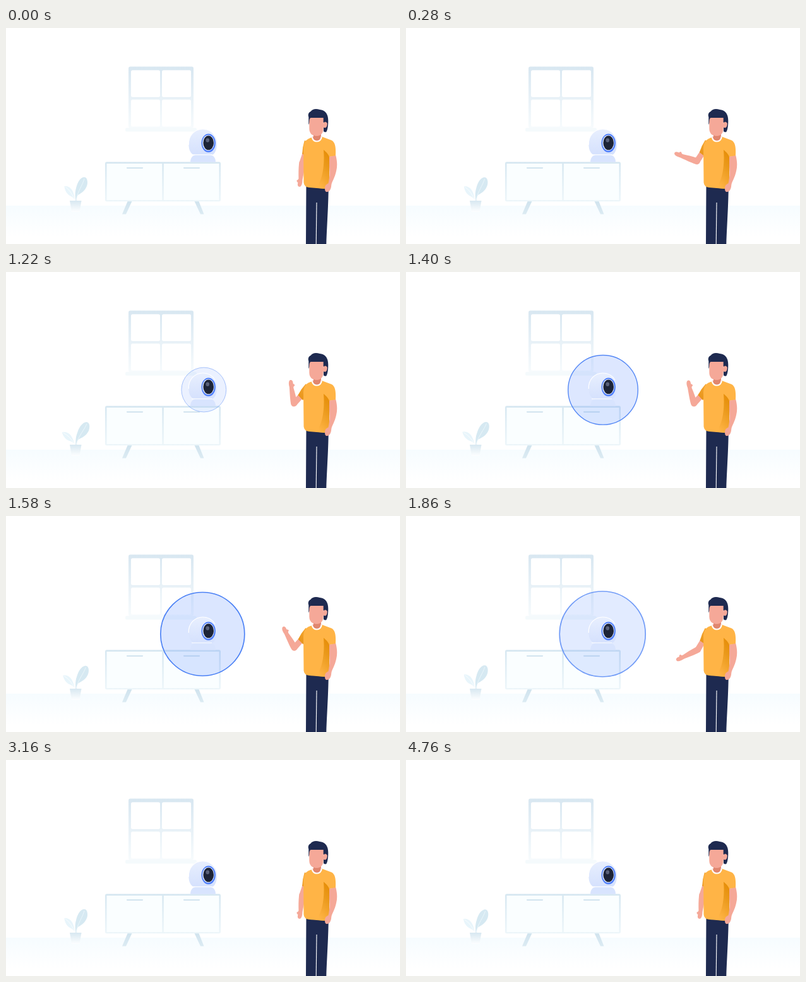
Recreate the animation shown at these times as an HTML page. Size 624x344 px, loop 4.8 s.

```html
<!DOCTYPE html>
<html lang="en">
<head>
<meta charset="utf-8">
<title>Waving at a camera</title>
<style>
html, body { margin: 0; width: 100%; height: 100%; overflow: hidden; background: #fff; }
svg { display: block; width: 100%; height: 100%; }
</style>
</head>
<body>
<svg viewBox="0 0 624 344">
  <defs>
    <linearGradient id="floor" x2="0" y2="1"><stop stop-color="#f6fcff"/><stop offset=".8" stop-color="#fff"/></linearGradient>
    <linearGradient id="frame" x2="0" y2="1"><stop stop-color="#d8e7f1"/><stop offset="1" stop-color="#f7fbfd"/></linearGradient>
    <linearGradient id="cabinet" x2="0" y2="1"><stop stop-color="#d6e7f1"/><stop offset="1" stop-color="#edf6fa"/></linearGradient>
    <linearGradient id="leg" x2="0" y2="1"><stop stop-color="#d0e3ee"/><stop offset="1" stop-color="#dcebf3"/></linearGradient>
    <linearGradient id="pot" x2="0" y2="1"><stop stop-color="#d8e8f1"/><stop offset="1" stop-color="#fdfeff"/></linearGradient>
    <linearGradient id="body" x2="0" y2="1"><stop stop-color="#e8effe"/><stop offset="1" stop-color="#d5e1fd"/></linearGradient>
    <linearGradient id="shade" x1=".8" x2=".4" y2="1"><stop stop-color="#e58c06"/><stop offset=".4" stop-color="#eb9a1c"/><stop offset="1" stop-color="#ffb446"/></linearGradient>
    <linearGradient id="sleeve" x2="0" y2="1"><stop stop-color="#f5a632"/><stop offset="1" stop-color="#e8951a"/></linearGradient>
  </defs>

  <rect y="283" width="624" height="61" fill="url(#floor)"/>

  <!-- window -->
  <rect x="194" y="61.5" width="103" height="98" rx="3" fill="url(#frame)"/>
  <g fill="#fff">
    <rect x="198" y="67.3" width="46" height="42.7" rx="2.5"/>
    <rect x="247" y="67.3" width="46" height="42.7" rx="2.5"/>
    <rect x="198" y="114" width="46" height="43" rx="2.5"/>
    <rect x="247" y="114" width="46" height="43" rx="2.5"/>
  </g>
  <rect x="189" y="159" width="113" height="6" rx="2.5" fill="#f5fafc"/>

  <!-- cabinet -->
  <path d="M193 275H200L190 296.5H184ZM298 275H305L313.5 296.5H308Z" fill="url(#leg)"/>
  <rect x="157" y="213.3" width="183" height="63" rx="2.5" fill="url(#cabinet)"/>
  <path d="M159.5 216H247.3V274H159.5ZM249.8 216H337.5V274H249.8Z" fill="#fafeff"/>
  <path d="M192 222.8H216M282 222.8H306" stroke="#d4e5f0" stroke-width="2.2" stroke-linecap="round"/>

  <!-- plant -->
  <g id="leafL">
    <path d="M109 274C108 267 107 257 99 253Q95 251 92.5 252C93 258 96 264 101 267Q106 269 109 274Z" fill="#e8f5fb"/>
    <path d="M94 253Q104 260 109 275" fill="none" stroke="#fff" stroke-width=".7"/>
  </g>
  <g id="leafR">
    <path d="M110.3 276C110 270 108.5 264 111 255C113 246 117 239 123 237.5C128 237 130 243 128.5 250C126 259 119 263 114 266Q111.5 269 111.5 276Z" fill="#d6e9f2"/>
    <path d="M124 240C121 251 114 259 111 274" fill="none" stroke="#edf7fb" stroke-width=".9"/>
  </g>
  <path d="M101 275H119.5L116.5 293H104Z" fill="url(#pot)"/>

  <!-- detection ring and camera -->
  <circle id="ring" fill="#4a80ff" fill-opacity=".2" stroke="#4a80f5"/>
  <path d="M292 213.5C292 207 295 203.5 300 202H324C329 203.5 332 207 332 213.5Z" fill="#d8e4fe"/>
  <path d="M289.3 184C289.3 170 299 161 311.5 161S334 171 334 184C334 192 332 198 328 201.5H296C291 198 289.3 192 289.3 184Z" fill="url(#body)"/>
  <path d="M289.3 186C288.5 171 299 161 311.5 161C321 161 328 166 331 172M294 202H326" fill="none" stroke="#fff" stroke-width="1.2"/>
  <ellipse cx="320.7" cy="183.3" rx="11.2" ry="14.8" fill="#4f7ffb"/>
  <ellipse cx="320.4" cy="182.9" rx="9.4" ry="12.5" fill="#e4ecff"/>
  <ellipse cx="320.7" cy="182.9" rx="8.3" ry="11.4" fill="#1d2437"/>
  <ellipse cx="319.3" cy="178.8" rx="2.8" ry="3.2" fill="#59617a"/>

  <!-- man -->
  <g id="upper">
    <path d="M-2 8L-4.8 33H4.8L7 8Z" fill="#f5a898"/>
    <g id="fore" fill="#f5a898">
      <path d="M5 0C5 10 3.6 20 3.1 27C3.6 32 3 36 .6 37.6C-2 38.5 -4 36.5 -3.6 33V31C-5 31 -5.9 29.5 -5.6 27.6C-4.6 28 -3.6 27 -3.1 25C-4 18 -5 10 -5 0A5 5 0 0 1 5 0Z"/>
    </g>
    <path d="M-4 -3Q-5 8 -3 18.5L8 20.5V-3Z" fill="url(#sleeve)"/>
  </g>
  <path d="M475.5 250L510.8 254C510.5 285 508 318 507.3 344H475Z" fill="#1e2a50"/>
  <path d="M492 278L491.2 344" stroke="#fff" stroke-width="1.1"/>
  <path d="M486 174C477 176 471.3 180 471 192L471.5 246Q472 253 480 254L507 256.3Q511.5 256 511.7 250L512.5 205L522 204C522.5 191 522 183 516 179L500 173Z" fill="#ffb446"/>
  <path d="M503 194C509 199 512 203 512.6 208L511.7 250Q511 256.3 507 256.3L491 254.5C501 243 505 220 503 194Z" fill="url(#shade)"/>
  <path d="M512 205L522.3 203C524.5 212 525 220 523 228C521 238 516 245 515.3 250C515 257 512 261 508 261C505 261 504.8 257 505.2 253Q506 249 510.5 247.5C512.5 240 513 228 512 220Z" fill="#f5a898"/>
  <path d="M485.3 173C485 183 500 183 499.5 172Z" fill="#e0866f"/>
  <path d="M487 164H499V173Q493 182 487 173Z" fill="#e0866f"/>
  <path d="M485 173.5C485 183 500 183 499.7 172.5" fill="none" stroke="#fff" stroke-width="2.2"/>
  <path d="M479.3 154V142C477.5 137 480 134 482.5 133Q487 127 497 130C506 131 510.3 137 510.3 148C510.3 157 509 163 507.3 165.4Q505 166.3 503 164.8V150H481Z" fill="#1e2a50"/>
  <path d="M480.3 149Q480.5 144 482.5 143H502.7V159C502.7 167 499 172 492 172C484 172 480.3 167 480.3 160Z" fill="#f5a898"/>
  <ellipse cx="505.3" cy="154.3" rx="3.3" ry="4.7" transform="rotate(15 505.3 154.3)" fill="#f5a898"/>
</svg>
<script>
const LOOP = 4800;
const $ = id => document.getElementById(id);

// Key poses as [time, value]
const upperKeys = [[0, 12], [480, 37], [1500, 37], [1860, 25], [2200, 12]];
const foreKeys = [[0, 6], [480, 171], [740, 147], [1200, 171], [1580, 151], [1860, 63], [2200, 6]];
const swayKeys = [[0, 0], [700, .55], [1200, 1], [1580, .6], [1860, .2], [2200, 0], [3080, 0], [4220, 1], [4760, .4], [4800, .35]];
const radiusKeys = [[1000, 0], [1080, 16], [1220, 35.3], [1580, 66.5], [1860, 68], [2160, 68.6]];
const alphaKeys = [[1020, 0], [1220, .55], [1480, 1], [1620, 1], [1860, .78], [2160, 0]];

// Monotone cubic interpolation, flat at both ends
function at(keys, t) {
  const last = keys.length - 1;
  if (t <= keys[0][0]) return keys[0][1];
  if (t >= keys[last][0]) return keys[last][1];
  const i = keys.findIndex(k => k[0] > t) - 1;
  const slope = n => (keys[n + 1][1] - keys[n][1]) / (keys[n + 1][0] - keys[n][0]);
  const tangent = n => {
    if (n === 0 || n === last) return 0;
    const a = slope(n - 1), b = slope(n);
    return a * b > 0 ? 2 * a * b / (a + b) : 0;
  };
  const [t0, v0] = keys[i], [t1, v1] = keys[i + 1];
  const h = t1 - t0, u = (t - t0) / h, w = 1 - u;
  return v0 * w * w * (1 + 2 * u) + v1 * u * u * (3 - 2 * u)
    + h * u * w * (tangent(i) * w - tangent(i + 1) * u);
}

function set(id, attrs) {
  for (const name in attrs) $(id).setAttribute(name, attrs[name]);
}

function draw(now) {
  const t = now % LOOP;
  const upper = at(upperKeys, t), sway = at(swayKeys, t), r = at(radiusKeys, t);

  set('upper', { transform: `translate(476 183) rotate(${upper})` });
  set('fore', { transform: `translate(0 33) rotate(${at(foreKeys, t) - upper})` });
  set('leafL', { transform: `rotate(${-10 * sway} 110 275)` });
  set('leafR', { transform: `rotate(${6.5 * sway} 111 275)` });
  set('ring', {
    cx: 311.2 + (68 - r) * .064,
    cy: 188 - (68 - r) * .015,
    r,
    'stroke-width': r * .025,
    opacity: at(alphaKeys, t)
  });
  requestAnimationFrame(draw);
}
draw(0);
</script>
</body>
</html>
```
